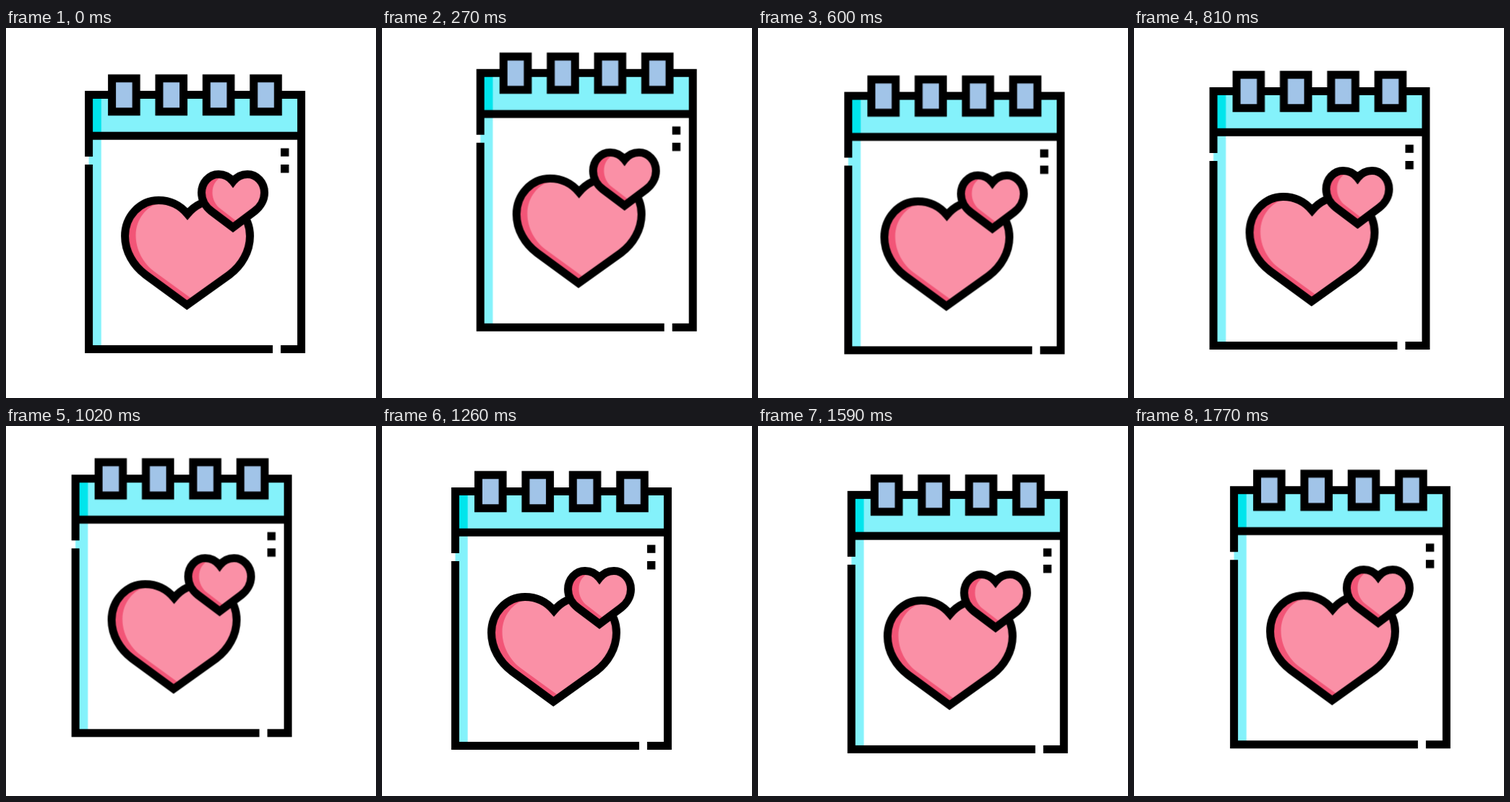
An HTML page without scripts that plays this animation: 512x512 px, repeating every 1.8 s.

```html
<!DOCTYPE html>
<html lang="en">
<head>
<meta charset="utf-8">
<title>Love notes</title>
<style>
  html, body { margin: 0; width: 100%; height: 100%; overflow: hidden; background: #fff; }
  svg { display: block; width: 100vw; height: 100vh; }

  .line { fill: none; stroke: #000; stroke-width: 11; }
  .aqua { fill: #84f2fb; }
  .aqua-dark { fill: #00e5ec; }
  .pink { fill: #fa90a6; }
  .pink-dark { fill: #f25577; }
  .ring { fill: #a1c4e8; stroke: #000; stroke-width: 11; }

  .drift-x { animation: drift-x 1.8s infinite; }
  .drift-y { animation: drift-y 1.8s infinite; }

  /* Bezier handles at 1/3 and 2/3 make each stretch a plain cubic in time */
  @keyframes drift-x {
    0%, .833% { transform: translateX(0);     animation-timing-function: cubic-bezier(.333, .25, .667, 1); }
    19.167% { transform: translateX(24px);    animation-timing-function: cubic-bezier(.333, 0, .667, .77); }
    32.5%   { transform: translateX(11px);    animation-timing-function: cubic-bezier(.333, .2, .667, 1.06); }
    60.833% { transform: translateX(-19.2px); animation-timing-function: cubic-bezier(.333, 0, .667, .95); }
    99.167%, 100% { transform: translateX(24px); }
  }
  @keyframes drift-y {
    0%, .833% { transform: translateY(0);     animation-timing-function: cubic-bezier(.333, .15, .667, 1); }
    15.833% { transform: translateY(-30.5px); animation-timing-function: cubic-bezier(.333, 0, .667, 1); }
    35.833% { transform: translateY(2.8px);   animation-timing-function: cubic-bezier(.333, 0, .667, 1); }
    59.722% { transform: translateY(-20.7px); animation-timing-function: cubic-bezier(.333, 0, .667, 1); }
    78.889% { transform: translateY(12.7px);  animation-timing-function: cubic-bezier(.333, 0, .667, 1); }
    95.833% { transform: translateY(-4px);    animation-timing-function: linear; }
    100%    { transform: translateY(-3.6px); }
  }
</style>
</head>
<body>
<svg viewBox="0 0 512 512">
  <defs>
    <rect id="ring" class="ring" x="146.5" y="69.8" width="33.6" height="46"/>
    <path id="big" d="M251 257.5C241 245.5 227 238.5 211 238.5C185 238.5 164.5 261 164.5 288C164.5 309 176 329 193 341.5L250.3 383.5L309 341.5C326 329 337.5 309 337.5 288C337.5 261 317 238.5 291 238.5C275 238.5 261 245.5 251 257.5Z"/>
    <path id="small" d="M314 212.5C309 206 302 202.5 294 202.5C281 202.5 270.5 214 270.5 228C270.5 238 276 247.5 284 253.5L314 276L344 253.5C352 247.5 357.5 238 357.5 228C357.5 214 347 202.5 334 202.5C326 202.5 319 206 314 212.5Z"/>
    <clipPath id="big-clip"><use href="#big"/></clipPath>
    <clipPath id="small-clip"><use href="#small"/></clipPath>
  </defs>

  <g class="drift-x"><g class="drift-y">
    <path class="aqua" d="M114.5 92.5H408.5V149H131.7V444.5H114.5Z"/>
    <path class="aqua-dark" d="M114.5 92.5H131.7V149H114.5Z"/>
    <path class="line" d="M114.5 178V92.5H408.5V444.5H380M369 444.5H114.5V189M114.5 149.2H408.5"/>

    <use href="#ring"/>
    <use href="#ring" x="65.4"/>
    <use href="#ring" x="130.8"/>
    <use href="#ring" x="196.2"/>

    <path d="M380 166.4h11.4v11.4h-11.4zM380 189h11.4v11.4h-11.4z"/>

    <use href="#big" class="pink"/>
    <path class="pink-dark" clip-path="url(#big-clip)" d="M213 242C195 246 179.5 264 179.5 287C179.5 307 190 326 205 337L260 377V400H150V230H213Z"/>
    <use href="#big" class="line"/>

    <use href="#small" class="pink"/>
    <path class="pink-dark" clip-path="url(#small-clip)" d="M299 206C291 209 285.5 217 285.5 228C285.5 237 290 245.5 297 250.5L321 269V290H260V195H299Z"/>
    <use href="#small" class="line"/>
  </g></g>
</svg>
</body>
</html>
```
